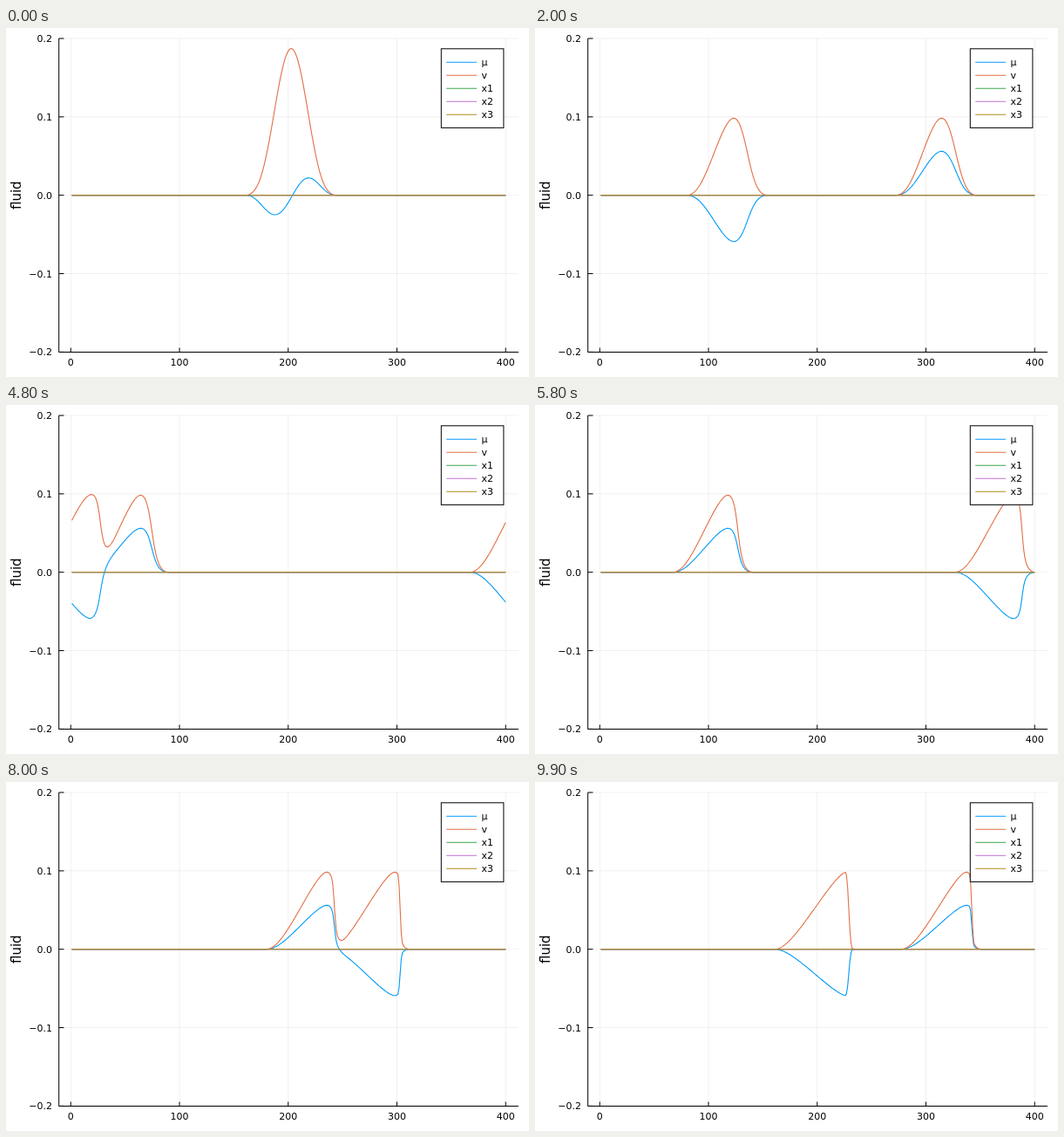
Write an HTML page that moves like this. It is 600 by 400 pixels and loops after 10000 ms.

```html
<!DOCTYPE html>
<html lang="en">
<head>
<meta charset="utf-8">
<title>Fluid waves</title>
<style>
html, body { margin: 0; width: 100%; height: 100%; overflow: hidden; background: #fff; }
svg { display: block; width: 600px; height: 400px; }
text { font-family: "DejaVu Sans", sans-serif; font-size: 11px; fill: #000; }
</style>
</head>
<body>
<svg id="stage" viewBox="0 0 600 400"></svg>
<script>
const STEP_MS = 100, STEPS = 100, CELLS = 400;
const AMPLITUDE = 0.0985, RADIUS = 39.3, CENTER = 202;
// speed of the foot, extra speed of the crest, ratio of velocity to height
const WAVES = [
  { speed: -4.04, steepen: 0.29, ratio: -0.6 },
  { speed: 5.12, steepen: 0.235, ratio: 0.57 }
];
const SERIES = [
  ['μ', '#009af9'], ['v', '#e26f46'], ['x1', '#3da44d'], ['x2', '#c271d2'], ['x3', '#ac8d18']
];
const stage = document.getElementById('stage');
const px = x => 74.3 + 1.2473 * x;
const py = y => 191.7 - 898.5 * y;

function add(tag, attrs, text) {
  const node = document.createElementNS('http://www.w3.org/2000/svg', tag);
  for (const key in attrs) node.setAttribute(key, attrs[key]);
  if (text) node.textContent = text;
  return stage.appendChild(node);
}
const line = (x1, y1, x2, y2, stroke, width = 1) =>
  add('line', { x1, y1, x2, y2, stroke, 'stroke-width': width });

const xTicks = [0, 100, 200, 300, 400], yTicks = [-0.2, -0.1, 0, 0.1, 0.2];
add('rect', { width: 600, height: 400, fill: '#fff' });
xTicks.forEach(x => line(px(x), 12, px(x), 371.5, '#000', 0.5).setAttribute('opacity', 0.12));
yTicks.forEach(y => line(61, py(y), 588, py(y), '#000', 0.5).setAttribute('opacity', 0.12));
line(60.7, 371.5, 588, 371.5, '#000');
line(60.7, 12, 60.7, 371.5, '#000');
xTicks.forEach(x => {
  line(px(x), 371.5, px(x), 366.5, '#000');
  add('text', { x: px(x), y: 387, 'text-anchor': 'middle' }, String(x));
});
yTicks.forEach(y => {
  line(60.7, py(y), 66.5, py(y), '#000');
  add('text', { x: 53, y: py(y) + 4, 'text-anchor': 'end' }, y.toFixed(1).replace('-', '−'));
});
add('text', { transform: 'translate(16.5 191.7) rotate(-90)', 'text-anchor': 'middle',
  style: 'font-size:15px' }, 'fluid');

const curves = SERIES.map(([, stroke]) =>
  add('polyline', { fill: 'none', stroke, 'stroke-width': 1.1, 'stroke-linejoin': 'round' }));

add('rect', { x: 499.3, y: 23.8, width: 71.6, height: 90.6, fill: '#fff', stroke: '#000' });
SERIES.forEach(([name, color], i) => {
  const y = 39.2 + 15 * i;
  line(505.2, y, 540, y, color, 1.1);
  add('text', { x: 545.5, y: y + 4 }, name);
});

// Heights on a quarter-cell grid relative to the wave's moving center.
const FINE = 4, REACH = 48;
function profile(shift) {
  const xs = [], vs = [];
  for (let s = -RADIUS; s <= RADIUS; s += 0.15) {
    const shape = Math.cos(Math.PI * s / 2 / RADIUS) ** 3;
    xs.push(s + shift * shape);
    vs.push(AMPLITUDE * shape);
  }
  // Sorting the falling side turns an overturned front into a steep one.
  const half = xs.length >> 1;
  const sorted = xs.slice(0, half).concat(xs.slice(half).sort((a, b) => a - b));
  const out = [];
  for (let i = 0, k = 0; i <= 2 * REACH * FINE; i++) {
    const x = i / FINE - REACH;
    while (k < sorted.length && sorted[k] < x) k++;
    if (k === 0 || k === sorted.length) { out.push(0); continue; }
    const part = (x - sorted[k - 1]) / (sorted[k] - sorted[k - 1] || 1);
    out.push(vs[k - 1] + part * (vs[k] - vs[k - 1]));
  }
  return out;
}

function sample(heights, x) {
  const at = (x + REACH) * FINE;
  let sum = 0;
  for (let d = -5; d <= 5; d++) {
    const i = Math.floor(at + d), part = at + d - i;
    sum += (heights[i] || 0) * (1 - part) + (heights[i + 1] || 0) * part;
  }
  return sum / 11;
}

const points = values => values.map((v, i) => px(i + 1).toFixed(2) + ',' + py(v).toFixed(2)).join(' ');
const flat = new Array(CELLS).fill(0);
curves.slice(2).forEach(curve => curve.setAttribute('points', points(flat)));

function draw(step) {
  const time = step + 1, velocity = flat.slice(), height = flat.slice();
  for (const { speed, steepen, ratio } of WAVES) {
    const heights = profile(steepen * time), center = CENTER + speed * time;
    for (let i = 0; i < CELLS; i++) {
      const away = i + 1 - center;
      const v = sample(heights, away - CELLS * Math.round(away / CELLS));
      height[i] += v;
      velocity[i] += ratio * v;
    }
  }
  curves[0].setAttribute('points', points(velocity));
  curves[1].setAttribute('points', points(height));
}

let shown = -1;
const start = performance.now();
function tick() {
  const step = Math.floor(Math.max(0, performance.now() - start) / STEP_MS) % STEPS;
  if (step !== shown) draw(shown = step);
  requestAnimationFrame(tick);
}
tick();
</script>
</body>
</html>
```
